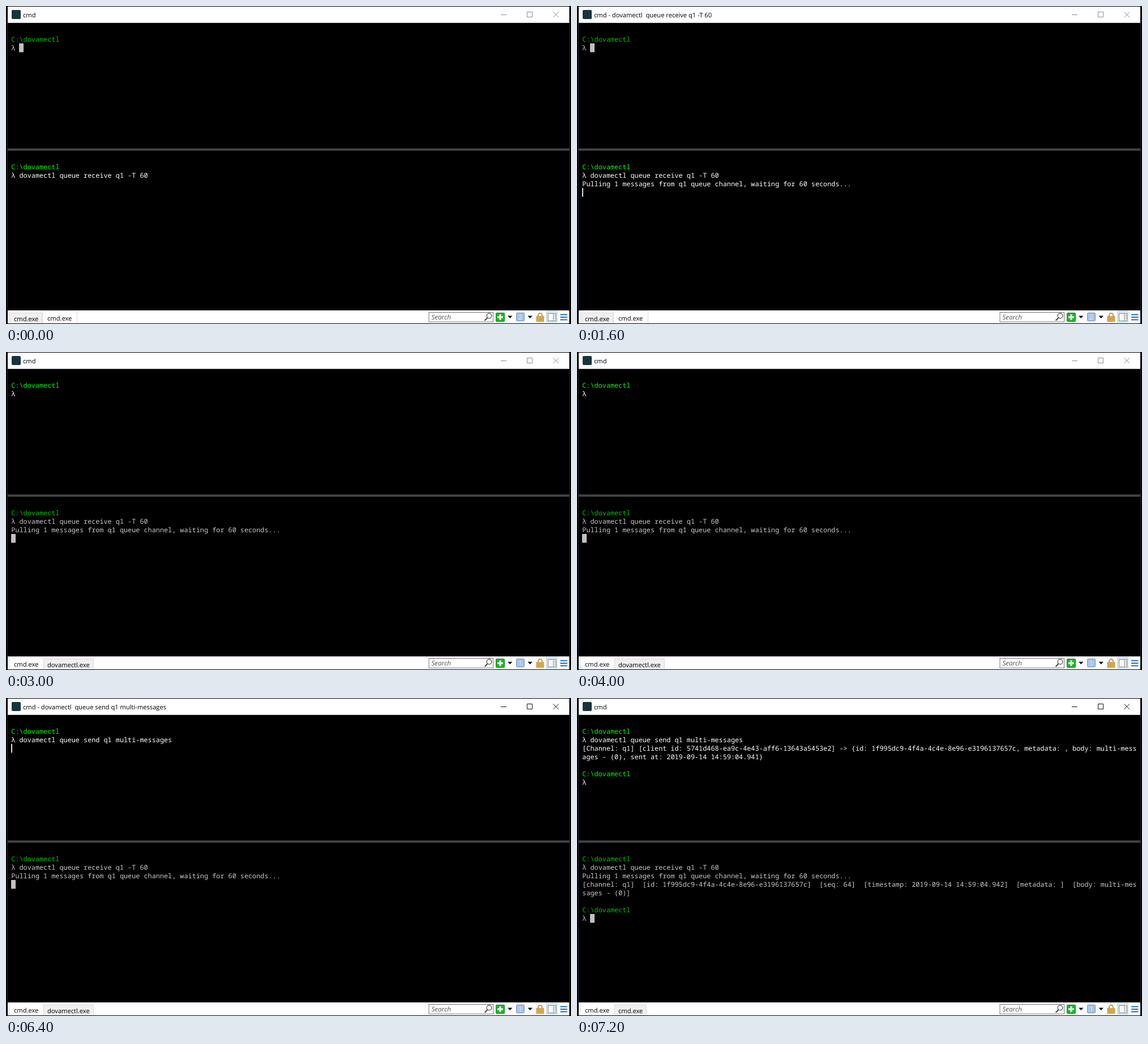
An HTML page that plays this animation: 998x561 px, repeating every 7400 ms.

```html
<!DOCTYPE html>
<html lang="en">
<head>
<meta charset="utf-8">
<title>Terminal</title>
<style>
  html, body { margin: 0; width: 100%; height: 100%; overflow: hidden; background: #000; }
  svg { display: block; width: 998px; height: 561px; }
  text { white-space: pre; text-rendering: geometricPrecision; }
  .ui { font: 11.15px "Open Sans", "Noto Sans", sans-serif; fill: #000; }
  .mono { font: 500 11.83px "Noto Sans Mono", "DejaVu Sans Mono", monospace; }
</style>
</head>
<body>
<svg viewBox="0 0 998 561">
  <path d="M2.5 30V537M995.5 30V537" stroke="#242424"/>
  <rect x="3" y="1" width="992" height="28.800" fill="#fff"/>
  <rect x="10" y="7" width="16" height="16" rx="2" fill="#17343d"/>
  <text id="title" class="ui" x="30" y="19.5"></text>
  <path id="buttons" fill="none" d="M874 15.5h10M920.5 10.5h9v9h-9zM966.5 10.5l9.5 9.5M976 10.5l-9.5 9.5"/>

  <g id="panes" class="mono"></g>
  <rect x="3" y="251.3" width="992" height="4" fill="#444"/>

  <rect x="3" y="537" width="992" height="23" fill="#fff"/>
  <g id="tabs" class="ui"></g>

  <rect x="747" y="540.5" width="113.500" height="17" fill="#fff" stroke="#777"/>
  <text class="ui" x="751.5" y="553" style="font-style:italic;font-size:11.6px;fill:#555">Search</text>
  <g fill="none" stroke="#444">
    <circle cx="853.5" cy="546.5" r="4.300" stroke-width="1.200"/>
    <path d="M850.5 550l-5 5" stroke-width="2"/>
  </g>

  <rect x="865.5" y="541.5" width="15" height="15" rx="1" fill="#20b32c" stroke="#128a1c"/>
  <path d="M873 544v10M868 549h10" stroke="#fff" stroke-width="3"/>
  <path d="M886 546.500h8.500l-4.250 4.500zM921.500 546.500h8.500l-4.250 4.500z" fill="#111"/>
  <rect x="901.5" y="541.5" width="14" height="14" rx="1" fill="#a9c4e6" stroke="#6d8fbd"/>
  <text id="count" class="ui" x="908.5" y="553" text-anchor="middle" style="fill:#e4eefb"></text>

  <path d="M940 549v-3.500a3.500 3.500 0 0 1 7 0v3.500" fill="none" stroke="#c39a48" stroke-width="2"/>
  <rect x="937" y="547.500" width="13" height="9" fill="#dfb35a" stroke="#b98b38" stroke-width=".8"/>
  <path d="M938 550.500h11M938 553.500h11" stroke="#b98b38"/>

  <rect x="954.5" y="538.5" width="19" height="20" fill="#d4e9f7" stroke="#b5d8ee"/>
  <rect x="957.5" y="542.5" width="14" height="13" fill="#f8f8f8" stroke="#8a8a8a"/>
  <path d="M967 543v12" stroke="#8a8a8a"/>
  <path d="M968 545.500h3M968 548.500h3M968 551.500h3" stroke="#aaa"/>
  <path d="M979 544.500h12.500M979 549h12.500M979 553.500h12.500" stroke="#1f6fbd" stroke-width="2"/>
</svg>
<script>
const LOOP = 7400, LEFT = 9.3, PITCH = 7.1, ROW = 15;
const TOOL = 'dovamectl';
const PROMPT = 'C:\\' + TOOL;
const MSG_ID = '1f995dc9-4f4a-4c4e-8e96-e3196137657c';
const SEND = 'queue send q1 multi-messages';
const RECEIVE = 'queue receive q1 -T 60';
const SENT = [
  `[Channel: q1] [client id: 5741d468-ea9c-4e43-aff6-13643a5453e2] -> {id: ${MSG_ID}, metadata: , body: multi-mess`,
  'ages - (0), sent at: 2019-09-14 14:59:04.941}'
];
const RECEIVED = [
  `[channel: q1]  [id: ${MSG_ID}]  [seq: 64]  [timestamp: 2019-09-14 14:59:04.942]  [metadata: ]  [body: multi-mes`,
  'sages - (0)]'
];
// caret visible: from, to, row, column
const CARETS = [
  [400, 800, 1, 34], [1400, 1600, 2, 0], [1600, 2000, 3, 0], [2600, 3000, 3, 0],
  [3400, 4000, 1, 2], [4600, 4800, 1, 2], [4800, 5400, 1, 40], [6000, 6400, 1, 40],
  [6400, 6600, 2, 0], [6600, 7200, 6, 2]
];

const el = id => document.getElementById(id);
const escapeText = s => s.replace(/&/g, '&amp;').replace(/</g, '&lt;').replace(/>/g, '&gt;');

function cursor(top, row, col, width, fill) {
  const x = Math.floor(LEFT + col * PITCH), y = Math.floor(top + 51.4 + row * ROW);
  return `<rect x="${x}" y="${y}" width="${width}" height="15.5" fill="${fill}"/>`;
}

function pane(top, lines, active, caret, block) {
  const text = lines.map((line, i) => {
    const green = line === PROMPT;
    const fill = green ? (active ? '#0f0' : '#00c400') : (active ? '#fff' : '#c8c8c8');
    return `<text x="${LEFT}" y="${top + 63 + i * ROW}" fill="${fill}">${escapeText(line)}</text>`;
  }).join('');
  if (!active) return text + cursor(top, ...block, 8, '#c0c0c0');
  return text + (caret ? cursor(top, caret[2], caret[3], 2, '#ddd') : '');
}

function tab(x, right, textX, label, active) {
  const y = active ? 538.5 : 541.5;
  return `<path d="M${x + .5} 560V${y}H${right - .5}V560" fill="${active ? '#fff' : '#f0f0f0'}" stroke="#dcdcdc"/>` +
    `<text x="${textX}" y="${active ? 554.5 : 556}">${label}</text>`;
}

function draw(t) {
  const sending = t >= 3000, done = t >= 6600;
  const caret = CARETS.find(c => t >= c[0] && t < c[1]);

  const upper = [PROMPT, t < 4800 ? 'λ' : `λ ${TOOL} ${SEND}`];
  const lower = [PROMPT, `λ ${TOOL} ${RECEIVE}`];
  if (t >= 1600) lower.push('Pulling 1 messages from q1 queue channel, waiting for 60 seconds...');
  if (done) {
    upper.push(...SENT, '', PROMPT, 'λ');
    lower.push(...RECEIVED, '', PROMPT, 'λ');
  }
  el('panes').innerHTML =
    pane(0, upper, sending, caret, [1, 2]) +
    pane(225.4, lower, !sending, caret, done ? [7, 2] : [3, 0]);

  const running = t >= 1400 && t < 3000 ? RECEIVE : t >= 6400 && !done ? SEND : '';
  el('title').textContent = running ? `cmd - ${TOOL}  ${running}` : 'cmd';
  el('buttons').setAttribute('stroke', t >= 4800 ? '#111' : '#8c8c8c');
  el('count').textContent = sending ? '1' : '2';

  const busy = t >= 1800 && t < 6800;
  const label = (busy ? TOOL : 'cmd') + '.exe';
  const end = (busy ? 155 : 123) + (sending ? 0 : 3);
  el('tabs').innerHTML =
    tab(sending ? 5 : 6, sending ? 67 : 64, 14, 'cmd.exe', sending) +
    tab(sending ? 66 : 64, end, 73, label, !sending);
}

// the picture only changes on 200 ms steps
let shown = -1;
function tick(now) {
  const step = Math.floor(now % LOOP / 200);
  if (step !== shown) draw((shown = step) * 200);
  requestAnimationFrame(tick);
}
draw(0);
requestAnimationFrame(tick);
</script>
</body>
</html>
```
